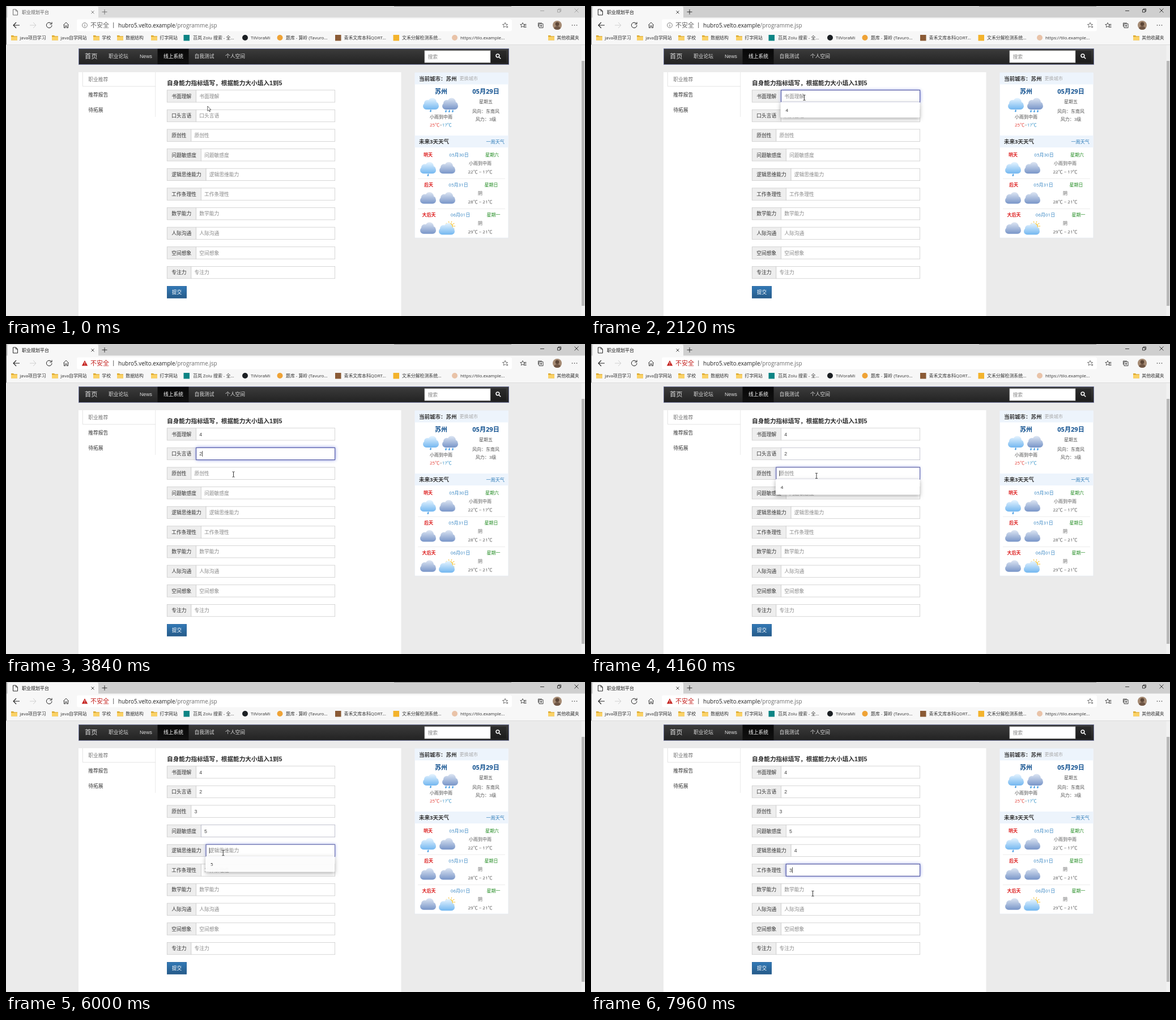
An HTML page with a canvas for the animation above (8 s loop, 1022x548 px).

```html
<!DOCTYPE html>
<html lang="zh-CN">
<head>
<meta charset="utf-8">
<title>职业规划平台</title>
<style>
html, body { margin: 0; width: 100%; height: 100%; overflow: hidden; background: #ebebeb; }
canvas { display: block; width: 1022px; height: 548px; }
</style>
</head>
<body>
<canvas id="stage"></canvas>
<script>
const W = 1022, H = 548, LOOP = 8000;
const canvas = document.getElementById('stage');
const c = canvas.getContext('2d');
const dpr = window.devicePixelRatio || 1;
canvas.width = W * dpr;
canvas.height = H * dpr;

const UI = '"Open Sans", "Noto Sans CJK SC", "Noto Sans CJK", sans-serif';
const PAGE = '"Liberation Sans", "Noto Sans CJK SC", "Noto Sans CJK", sans-serif';
const BLINK = 530, FADE = 150;

// Form rows: label, typed digit, suggestion, focus time, typing time
const fields = [
  ['书面理解', '4', '4', 545, 2450],
  ['口头言语', '2', '4', 3050, 3560],
  ['原创性', '3', '4', 4060, 4580],
  ['问题敏感度', '5', '5', 5250, 5500],
  ['逻辑思维能力', '4', '5', 5910, 6900],
  ['工作条理性', '3', '5', 7440, 7860],
  ['数学能力'], ['人际沟通'], ['空间想象'], ['专注力']
].map(([label, value, hint, focus = Infinity, typed = Infinity], i) => ({
  label, value, hint, focus, typed,
  y: 159.4 + 34.63 * i,
  left: 284 + 16.6 + 8.75 * label.length
}));
fields.forEach((f, i) => { f.blur = i < 9 ? fields[i + 1].focus : Infinity; });

// Pointer keys: time, x, y
const moves = [
  [40, 355.5, 177], [370, 359, 167], [1310, 359, 167], [1560, 369, 174],
  [1880, 376.5, 162], [2560, 376.5, 162], [2980, 381, 192], [3220, 383, 202.5],
  [3270, 383, 202.5], [3390, 387, 205], [3600, 387, 205], [3840, 401.5, 230.5],
  [4160, 398, 233], [4700, 398, 233], [5180, 374, 272], [5560, 375, 272],
  [5920, 382, 300], [6160, 387, 308], [6290, 388.5, 310.5], [7020, 388.5, 310.5],
  [7220, 389, 322], [7390, 389, 322], [7460, 390, 334], [7560, 390, 337],
  [7920, 391.5, 374]
];

const clamp = v => Math.max(0, Math.min(1, v));
const mix = (a, b, k) => a + (b - a) * k;
const easeOut = k => 1 - (1 - clamp(k)) ** 2;
const grey = v => `rgb(${v},${v},${v})`;

function text(s, x, cy, size, color, o = {}) {
  c.font = `${o.bold ? 'bold ' : ''}${size}px ${o.font || UI}`;
  c.textAlign = o.align || 'left';
  c.fillStyle = color;
  c.fillText(s, x, cy + size * 0.37);
}
function rect(x, y, w, h, color) {
  c.fillStyle = color;
  c.fillRect(x, y, w, h);
}
function round(x, y, w, h, r, color) {
  c.beginPath();
  c.roundRect(x, y, w, h, r);
  c.fillStyle = color;
  c.fill();
}
function frame(x, y, w, h, color, width = 0.8) {
  c.strokeStyle = color;
  c.lineWidth = width;
  c.strokeRect(x, y, w, h);
}
function dot(x, y, r, color) {
  c.beginPath();
  c.arc(x, y, r, 0, 7);
  c.fillStyle = color;
  c.fill();
}
function line(d, color = '#333', width = 1) {
  c.strokeStyle = color;
  c.lineWidth = width;
  c.stroke(new Path2D(d));
}
function shape(d, color) {
  c.fillStyle = color;
  c.fill(new Path2D(d));
}
function fade(y, h, top, bottom) {
  const g = c.createLinearGradient(0, y, 0, y + h);
  g.addColorStop(0, top);
  g.addColorStop(1, bottom);
  return g;
}
function star(x, y, r, color) {
  c.beginPath();
  for (let i = 0; i < 10; i++) {
    const a = Math.PI * (i / 5 - 0.5), q = i % 2 ? r * 0.45 : r;
    c.lineTo(x + q * Math.cos(a), y + q * Math.sin(a));
  }
  c.closePath();
  c.strokeStyle = color;
  c.lineWidth = 0.8;
  c.stroke();
}
function folder(x) {
  shape(`M${x} 52h4l1.3 1.2h5.7v7.3h-11z`, '#d9a62c');
  shape(`M${x} 54.3h11v6.2h-11z`, '#fbd266');
}

function drawChrome(active, warned) {
  rect(0, 0, W, 21, grey(Math.round(mix(219, 207, active))));
  shape('M3 21V3q0-2 2-2H161q2 0 2 2V21z', '#f7f7f7');
  rect(0, 20.5, W, 48, '#f7f7f7');
  rect(685, 0, 207, 1, '#8a8a8a');
  rect(0, 0, 1, 69, '#666');
  const ink = grey(Math.round(mix(95, 20, active)));
  const control = grey(Math.round(mix(150, 20, active)));
  line('M12.5 6h5l3 3v7h-8zM17.5 6v3h3', ink, 0.9);
  text('职业规划平台', 28, 10.8, 8, ink);
  line('M150.5 8.5l5 5M155.5 8.5l-5 5', ink, 0.8);
  line('M169.5 10.5h9M174 6v9', ink, 0.8);
  line('M943 8.5h7M973.5 6.5h4.5v4.5h-4.5zM975 6.5V5h4.5v4.5H978M1003.5 4.5l7 7M1010.5 4.5l-7 7', control, 0.8);

  line('M24 34H13M18 29l-5 5 5 5', '#222', 1.1);
  line('M42 34h11M48 29l5 5-5 5', '#d0d0d0', 1);
  line('M80 31a4.8 4.8 0 1 0 1 3M81 28.5v3.5h-3.7', '#222', 1);
  line('M101.5 33.5l4.5-4.5 4.5 4.5M102.5 33v5.5h2.3v-3.5h2.4v3.5h2.3V33', '#222', 0.9);

  round(125, 23.5, 768, 21, 3, '#fff');
  if (warned) {
    shape('M139 29l5.2 9.6h-10.4z', '#c5221f');
    rect(138.6, 32, 0.9, 3.5, '#fff');
    rect(138.6, 36.4, 0.9, 1, '#fff');
  } else {
    c.beginPath();
    c.arc(139, 34, 4.4, 0, 7);
    c.strokeStyle = '#666';
    c.lineWidth = 0.8;
    c.stroke();
    rect(138.6, 33, 0.9, 3.5, '#666');
    rect(138.6, 31.3, 0.9, 1, '#666');
  }
  text('不安全', 149, 34.2, 11, warned ? '#c5221f' : '#666');
  rect(189.3, 29, 0.9, 10, '#555');
  const host = 'hubro5.velto.example';
  text(host, 198, 34, 9.9, '#222');
  text('/programme.jsp', 198 + c.measureText(host).width, 34, 9.9, '#6b6b6b');

  star(881, 34, 4.8, '#555');
  dot(884.5, 37, 2.2, '#fff');
  line('M882.8 37h3.6M884.6 35.2v3.6', '#555', 0.8);
  star(912, 34, 4.5, '#333');
  line('M915 32.5h3.5M914.5 35h4M915 37.5h3.5', '#333', 0.9);
  line('M939.5 36.5v-6.5h6.5M941 31.5h7v7h-7zM944.5 33v4M942.5 35h4', '#333', 0.9);
  dot(973, 34, 8, '#a58a73');
  c.save();
  c.beginPath();
  c.arc(973, 34, 8, 0, 7);
  c.clip();
  dot(973, 32, 3.4, '#5d4636');
  dot(973, 42, 6.5, '#6f5645');
  c.restore();
  for (const x of [999.5, 1003.5, 1007.5]) dot(x, 34, 0.8, '#333');

  [[9, 'java项目学习'], [81, 'java自学网站'], [154, '学校'], [196, '数据结构'], [256, '打字网站'], [957, '其他收藏夹']]
    .forEach(([x, s]) => { folder(x); text(s, x + 15.3, 56.2, 7.9, '#333'); });
  [[313.5, '苔岚 Zolu 搜索 - 全...', '#0c8484', 0, 330],
   [417, 'TilVoraMi', '#1b1f23', 1, 432],
   [478.5, '题库 - 算岭 (Tavuro...', '#efa336', 1, 494],
   [581, '青禾文库本科QDRT...', '#8a5a35', 0, 596.5],
   [683.5, '文禾分解检测系统...', '#f3b32c', 0, 699],
   [787, 'https://tilo.example...', '#e9c3a8', 1, 802]]
    .forEach(([x, s, color, ring, tx]) => {
      if (ring) dot(x + 5, 56, 5, color); else rect(x, 51, 10.5, 10.5, color);
      text(s, tx, 56.2, 7.9, '#333');
    });
  rect(0, 68, W, 0.8, '#d8d8d8');
}

function drawNav() {
  rect(128, 75, 760, 28.5, fade(75, 28.5, '#3c3c3c', '#222'));
  frame(128.4, 75.4, 759.2, 27.9, '#7f86b4', 0.8);
  rect(267.5, 75.8, 55, 27, fade(75, 28, '#080808', '#101010'));
  text('首页', 139, 89, 11.25, '#ddd', { font: PAGE });
  [[181, '职业论坛'], [236, 'News'], [278, '线上系统'], [332.5, '自我测试'], [387, '个人空间']]
    .forEach(([x, s]) => text(s, x, 89, 8.75, x === 278 ? '#fff' : '#ddd', { font: PAGE }));
  rect(739, 79, 116, 21, '#fff');
  frame(739, 79, 116, 21, '#ccc');
  text('搜索', 744.5, 90, 8.75, '#888', { font: PAGE });
  rect(855.5, 79, 27.5, 21, fade(79, 21, '#2b2b2b', '#1c1c1c'));
  line('M870.8 87.8a2.9 2.9 0 1 1-5.8 0a2.9 2.9 0 1 1 5.8 0M870.2 90.2l3 3', '#fff', 1.5);
}

function cloud(x, y, light) {
  const colors = light ? ['#e4f3ff', '#73b7f0'] : ['#dbe4f2', '#7895c8'];
  c.beginPath();
  c.roundRect(x - 14, y - 2, 28, 12, 6);
  for (const [dx, dy, r] of [[-6, -1, 6], [2.5, -3, 7.5], [8, 2, 5.5]]) {
    c.moveTo(x + dx + r, y + dy);
    c.arc(x + dx, y + dy, r, 0, 7);
  }
  c.fillStyle = fade(y - 10, 20, ...colors);
  c.fill();
}
function drop(x, y) {
  shape(`M${x + 1} ${y - 2.5}q2.2 4.6-.8 5q-3-.4.8-5z`, '#5aa7e6');
}
function sun(x, y) {
  for (let i = 0; i < 10; i++) {
    const a = i * Math.PI / 5, p = Math.cos(a), q = Math.sin(a);
    line(`M${x + p * 6.5} ${y + q * 6.5}L${x + p * 9} ${y + q * 9}`, '#f7c955', 1.3);
  }
  dot(x, y, 5.5, '#fbd25f');
}

function drawWeather() {
  const mid = { align: 'center' }, bold = { bold: true }, both = { bold: true, align: 'center' };
  rect(721, 117, 166, 293, '#fff');
  frame(721.4, 117.4, 165.4, 292.6, '#e3e8ef', 0.7);
  rect(721.5, 118, 165, 20.5, '#edf4fc');
  rect(721.5, 229, 165, 21, '#edf4fc');
  text('当前城市：苏州', 729, 128.3, 9.5, '#333', bold);
  text('更换城市', 800.5, 128.3, 8.1, '#aaa');
  text('苏州', 768, 151, 11, '#10508f', both);
  text('05月29日', 847, 151.3, 11.1, '#10508f', both);
  text('星期五', 847, 169, 8, '#555', mid);
  text('风向：东南风', 847, 186, 8, '#555', mid);
  text('风力：3级', 847, 200, 8, '#555', mid);
  text('小雨到中雨', 768, 196, 8, '#444', mid);
  let x = 748;
  for (const [s, color] of [['25℃', '#e2352d'], ['~', '#555'], ['17℃', '#2f8fc6']]) {
    text(s, x, 210, 8, color);
    x += c.measureText(s).width;
  }
  cloud(750, 173, true);
  drop(749, 185);
  cloud(784, 173, false);
  [776, 782, 788].forEach(dx => drop(dx, 185.5));

  text('未来3天天气', 729, 239.8, 9.5, '#333', bold);
  text('一周天气', 847.5, 239.8, 8.1, '#2a7ab8');
  [['明天', 745, '05月30日', 799.5, '星期六', 858, '小雨到中雨', '22℃ ~ 17℃'],
   ['后天', 746, '05月31日', 798.5, '星期日', 856.5, '阴', '28℃ ~ 21℃'],
   ['大后天', 746.5, '06月01日', 802, '星期一', 860.5, '阴', '29℃ ~ 21℃']]
    .forEach(([day, dx, date, ax, week, wx, sky, temp], i) => {
      const y = 262.8 + 53.2 * i;
      text(day, dx, y, 8, '#dd1f1f', both);
      text(date, ax, y, 8, '#2f80c0', mid);
      text(week, wx, y, 8, '#1f8a1f', mid);
      text(sky, 837, y + 15.3, 8, '#555', mid);
      text(temp, 837, y + 29.8, 8, '#555', mid);
      if (i) rect(727, y - 11.2, 154, 0.7, '#e4e4e4');
      cloud(745, y + 23.5, i === 0);
      if (i === 2) sun(784, y + 20);
      cloud(i === 2 ? 778 : 779, y + (i === 2 ? 25 : 23.5), i === 2);
    });
  drop(744.5, 298.5);
}

function drawField(f, t) {
  const top = f.y - 10.7, h = 21.4, w = 580.6 - f.left;
  rect(284, top, f.left - 284, h, '#eee');
  frame(284.3, top, f.left - 284.3, h, '#ccc');
  text(f.label, 292.3, f.y, 8.75, '#333', { font: PAGE });
  const glow = easeOut((t - f.focus) / FADE) * (1 - easeOut((t - f.blur) / FADE));
  c.save();
  c.shadowColor = `rgba(90,105,215,${0.75 * glow})`;
  c.shadowBlur = 6 * dpr * glow;
  rect(f.left, top, w, h, '#fff');
  c.restore();
  frame(f.left, top, w, h, '#ccc');
  if (glow) frame(f.left, top, w, h, `rgba(75,82,165,${glow})`, 0.9 + 0.2 * glow);

  const x = f.left + 5.6, typed = t >= f.typed;
  text(typed ? f.value : f.label, x, f.y, 8.75, typed ? '#444' : '#888', { font: PAGE });
  if (t >= f.focus && t < f.blur) {
    const start = (typed ? f.typed : f.focus) - 20;
    const end = typed ? c.measureText(f.value).width + 0.3 : 0;
    if (Math.floor((t - start) / BLINK) % 2 === 0) rect(x + end, f.y - 5, 0.8, 10, '#222');
  }
}

function drawHint(f, t) {
  if (t < f.focus || t >= f.typed) return;
  c.save();
  c.globalAlpha = clamp((t - f.focus) / 95);
  const x = f.left - 1, y = f.y + 10;
  c.shadowColor = 'rgba(0,0,0,.32)';
  c.shadowBlur = 7 * dpr;
  c.shadowOffsetY = 2.5 * dpr;
  round(x, y, 580.5 - x, 27.8, 1.5, '#fff');
  c.shadowColor = 'transparent';
  text(f.hint, x + 8.8, f.y + 24.2, 8, '#222');
  c.restore();
}

function drawPage(t) {
  rect(0, 68.5, W, H, '#ebebeb');
  drawNav();
  rect(128, 117, 569.5, H, '#fff');
  line('M135.3 117V142H264', '#ddd', 0.8);
  line('M263.8 117V196', '#e2e2e2', 0.8);
  text('职业推荐', 145.3, 130, 8.75, '#777', { font: PAGE });
  text('推荐报告', 145.3, 156.6, 8.75, '#333', { font: PAGE });
  text('待拓展', 145.3, 183.5, 8.75, '#333', { font: PAGE });
  text('自身能力指标填写，根据能力大小填入1到5', 284, 136, 10.65, '#2b2b2b', { font: PAGE, bold: true });
  drawWeather();
  fields.forEach(f => drawField(f, t));
  rect(284, 495, 35, 21.6, fade(495, 22, '#337ab7', '#265a88'));
  frame(284.3, 495.3, 34.4, 21, '#2d6598', 0.6);
  text('提交', 292.8, 506, 8.75, '#fff', { font: PAGE });
  fields.forEach(f => drawHint(f, t));
  rect(1015.5, 69, 6.5, H, '#f1f1f1');
  rect(1016, 97, 5.2, 433, '#b8b8b8');
}

function drawPointer(t) {
  let x = moves[0][1], y = moves[0][2];
  for (let i = 0; i < moves.length; i++) {
    const [a, ax, ay] = moves[i], [b, bx, by] = moves[i + 1] || [LOOP, ax, ay];
    if (t < a) break;
    const k = clamp((t - a) / (b - a)), e = k * k * (3 - 2 * k);
    x = mix(ax, bx, e);
    y = mix(ay, by, e);
  }
  c.save();
  c.translate(x, y);
  if (t < 300) {
    const d = 'M.3 0V8.6L2.3 6.8L3.6 9.8L5 9.2L3.7 6.3H6.2z';
    shape(d, '#fff');
    line(d, '#222', 0.7);
  } else {
    line('M-2 -4.6H-.5L0 -4.2L.5 -4.6H2M0 -4.2V4.2M-2 4.6H-.5L0 4.2L.5 4.6H2', '#222', 0.9);
  }
  c.restore();
}

function draw() {
  const t = performance.now() % LOOP;
  c.setTransform(dpr, 0, 0, dpr, 0, 0);
  drawPage(t);
  drawChrome(clamp((t - 550) / 130), t >= fields[0].typed);
  drawPointer(t);
  requestAnimationFrame(draw);
}
draw();
</script>
</body>
</html>
```
